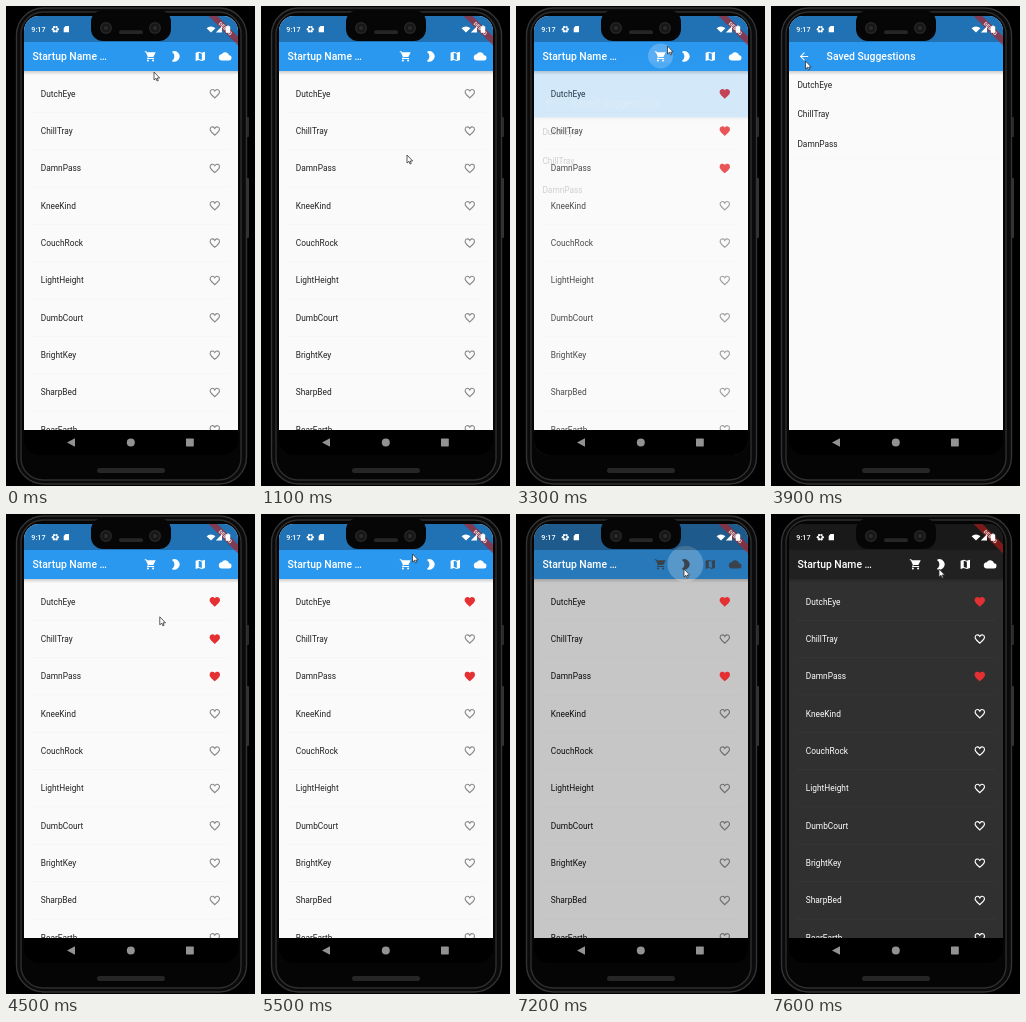
Write an HTML page with a canvas that moves like this. It is 249 px wide and 480 px high and loops after 8 s.

```html
<!DOCTYPE html>
<html lang="en">
<head>
<meta charset="utf-8">
<title>Startup Name</title>
<style>
html, body { margin: 0; width: 100%; height: 100%; overflow: hidden; background: #000; }
canvas { display: block; width: 249px; height: 480px; }
</style>
</head>
<body>
<canvas id="stage"></canvas>
<script>
const W = 249, H = 480, LOOP = 8000, STEP = 100;
const DP = 0.52; // stage pixels per device pixel
const LEFT = 18, TOP = 10, WIDE = 214, BAR = 65, NAV = 424;
const FONT = 'Roboto, "Open Sans", sans-serif';
const GREY = '#929292';
const canvas = document.getElementById('stage');
const ctx = canvas.getContext('2d');
const dpr = window.devicePixelRatio || 1;
canvas.width = Math.round(W * dpr);
canvas.height = Math.round(H * dpr);

const NAMES = ['DutchEye', 'ChillTray', 'DamnPass', 'KneeKind', 'CouchRock',
  'LightHeight', 'DumbCourt', 'BrightKey', 'SharpBed', 'BearEarth'];
const TOOLS = ['cart', 'moon', 'map', 'cloud'];

// shapes on a 24 unit grid
const ICONS = {
  cart: 'M1 2h3l1 2h17l-4.500 9H8.500l-1 2H19v2H5l2-4-4-9H1z' +
    'M5 20a2 2 0 0 0 4 0a2 2 0 0 0-4 0zM15 20a2 2 0 0 0 4 0a2 2 0 0 0-4 0z',
  moon: 'M5 3.340a10 10 0 1 1 0 17.320a10 10 0 0 0 0-17.320z',
  map: 'M3 5l6-2 6 2 6-2v16l-6 2-6-2-6 2zM9 5v12l6 2V7z',
  cloud: 'M19.350 10A7.500 7.500 0 0 0 5.350 8A6 6 0 0 0 6 20h13a5 5 0 0 0 .35-10z',
  heart: 'M12 21.300C5 15 2 12.300 2 8.500A5.500 5.500 0 0 1 12 5.100A5.500 5.500 0 0 1 22 8.500C22 12.300 19 15 12 21.300z',
  back: 'M20 11H8l5.500-5.500L12 4l-8 8 8 8 1.500-1.500L8 13h12z'
};
for (const k in ICONS) ICONS[k] = new Path2D(ICONS[k]);
const POINTER = new Path2D('M0 0V8L2 6.300 3 9 4.300 8.500 3.200 6H5.700z');

const rowY = i => 87.6 + 37.35 * i;
const toolX = i => 144.5 + 24.9 * i;
const SPOTS = {
  like: row => [209, rowY(row)],
  open: () => [151.5, 40],
  close: () => [34.5, 55],
  theme: () => [168, 55],
  hover: (x, y) => [x, y]
};
const tap = (at, kind, ...args) => ({ at, kind, row: args[0], spot: SPOTS[kind](...args) });
const PLAN = [
  tap(0, 'hover', 148, 66), tap(1000, 'hover', 146, 149),
  tap(1700, 'like', 0), tap(2200, 'like', 1), tap(2800, 'like', 2),
  tap(3200, 'open'), tap(4000, 'close'), tap(4800, 'like', 1),
  tap(5600, 'open'), tap(6385, 'close'), tap(6500, 'hover', 152, 51),
  tap(7000, 'theme')
];
const taps = kind => PLAN.filter(s => s.kind === kind);
const SLIDE = 270;

const clamp = v => Math.max(0, Math.min(1, v));
const lerp = (a, b, p) => a + (b - a) * p;
const smooth = p => p * p * (3 - 2 * p);
const mix = (a, b, p) => `rgb(${a.map((v, i) => Math.round(lerp(v, b[i], p)))})`;

function bezier(x1, y1, x2, y2, x) {
  const at = (a, b, s) => 3 * a * s * (1 - s) ** 2 + 3 * b * s * s * (1 - s) + s ** 3;
  let lo = 0, hi = 1;
  for (let i = 0; i < 24; i++) {
    const mid = (lo + hi) / 2;
    if (at(x1, x2, mid) < x) lo = mid; else hi = mid;
  }
  return at(y1, y2, lo);
}

function rect(x, y, w, h, fill) {
  ctx.fillStyle = fill;
  ctx.fillRect(x, y, w, h);
}

function box(x, y, w, h, r, fill, stroke) {
  ctx.beginPath();
  ctx.roundRect(x, y, w, h, r);
  ctx.fillStyle = fill;
  ctx.fill();
  if (!stroke) return;
  ctx.strokeStyle = stroke;
  ctx.lineWidth = 1.4;
  ctx.stroke();
}

function disc(x, y, r, fill) {
  ctx.beginPath();
  ctx.arc(x, y, r, 0, 7);
  ctx.fillStyle = fill;
  ctx.fill();
}

function poly(points, fill) {
  ctx.beginPath();
  points.forEach(p => ctx.lineTo(...p));
  ctx.fillStyle = fill;
  ctx.fill();
}

function text(s, x, y, size, weight, fill, align = 'left') {
  ctx.font = `${weight} ${size}px ${FONT}`;
  ctx.textAlign = align;
  ctx.fillStyle = fill;
  ctx.fillText(s, x, y);
}

function icon(name, x, y, color, outline) {
  ctx.save();
  ctx.translate(x, y);
  ctx.scale(DP, DP);
  ctx.translate(-12, -12);
  if (outline) {
    ctx.clip(ICONS[name]);
    ctx.strokeStyle = color;
    ctx.lineWidth = 4.2;
    ctx.stroke(ICONS[name]);
  } else {
    ctx.fillStyle = color;
    ctx.fill(ICONS[name], 'evenodd');
  }
  ctx.restore();
}

function barRipple(t, start, x) {
  const age = t - start;
  if (age < 0 || age > 550) return;
  const a = 0.22 * clamp((550 - age) / 350);
  disc(x, 50, lerp(7, 18, clamp(age / 200)), `rgba(255,255,255,${a})`);
}

function appBar(fill) {
  const g = ctx.createLinearGradient(0, BAR, 0, BAR + 4);
  g.addColorStop(0, 'rgba(0,0,0,.18)');
  g.addColorStop(1, 'rgba(0,0,0,0)');
  rect(LEFT, BAR, WIDE, 4, g);
  rect(LEFT, TOP, WIDE, BAR - TOP, fill);
}

const isLiked = (t, row) =>
  taps('like').filter(s => s.row === row && t >= s.at).length % 2 === 1;

function tileRipple(t, { at, row }) {
  const age = t - at;
  if (age < 0 || age >= 500) return;
  const y = rowY(row);
  ctx.save();
  ctx.beginPath();
  ctx.rect(26, y - 15, 198, 29.5);
  ctx.clip();
  const a = 0.36 * clamp((500 - age) / 200);
  disc(211, y, lerp(10, 25.5, clamp(age / 100)), `rgba(200,200,200,${a})`);
  ctx.restore();
}

function homePage(t) {
  const { at } = taps('theme')[0];
  const p = smooth(clamp((t - at - 100) / 300));
  const dark = p > 0.5;
  const ink = dark ? '#fff' : p ? '#0c0c0c' : '#212121';
  const tool = p && !dark ? '#3a434c' : '#fff';
  rect(LEFT, TOP, WIDE, NAV - TOP, mix([250, 250, 250], [48, 48, 48], p));
  taps('like').forEach(s => tileRipple(t, s));
  NAMES.forEach((name, i) => {
    const y = rowY(i), on = isLiked(t, i);
    text(name, 34.8, y + 3, 8.33, 400, ink);
    icon('heart', 208.8, y + 0.2, on ? '#e53033' : dark ? '#fff' : 'rgba(0,0,0,.45)', !on);
    rect(26, y + 18.4, 198, 0.6, dark ? 'rgba(255,255,255,.04)' : 'rgba(0,0,0,.03)');
  });
  appBar(mix([43, 152, 240], [33, 33, 33], p));
  taps('open').forEach(s => barRipple(t, s.at, toolX(0)));
  barRipple(t, at, toolX(1));
  text('Startup Name …', 26.4, 54.2, 10.4, 500, '#fff');
  TOOLS.forEach((name, i) => icon(name, toolX(i), 50.4, tool));
}

function savedPage(t) {
  const closes = taps('close').map(s => s.at);
  const turn = taps('open').findIndex((s, i) => t > s.at && t < closes[i] + SLIDE);
  if (turn < 0) return;
  const open = taps('open')[turn].at, close = closes[turn];
  const v = clamp((t - open) / SLIDE) - clamp((t - close) / SLIDE);
  ctx.save();
  ctx.globalAlpha = bezier(0.42, 0, 1, 1, v);
  ctx.translate(0, 103 * (1 - bezier(0.4, 0, 0.2, 1, v)));
  rect(LEFT, BAR, WIDE, NAV - BAR, '#fafafa');
  NAMES.filter((_, i) => isLiked(t, i)).forEach((name, i) => {
    const y = 79.3 + 29.1 * i;
    text(name, 26.4, y + 3, 8.33, 400, '#212121');
    rect(LEFT, y + 14.5, WIDE, 0.5, 'rgba(0,0,0,.025)');
  });
  appBar('#2b98f0');
  barRipple(t, close - 50, 33);
  icon('back', 33, 50.4, '#fff');
  text('Saved Suggestions', 55.6, 54.2, 10.4, 500, '#fff');
  ctx.restore();
}

function statusIcons() {
  text('9:17', 25.3, 25.8, 7.2, 500, '#fff');
  for (let i = 0; i < 6; i++) {
    const a = i * Math.PI / 3;
    disc(49.3 + 2.4 * Math.cos(a), 23.2 + 2.4 * Math.sin(a), 1.2, '#fff');
  }
  poly([[59.5, 20], [63, 20], [63, 26.3], [57.7, 26.3], [57.7, 22]], '#fff');
  ctx.beginPath();
  ctx.moveTo(205, 26.4);
  ctx.arc(205, 26.4, 6, -Math.PI * 0.76, -Math.PI * 0.24);
  ctx.fill();
  poly([[209.8, 26.4], [216, 20.2], [216, 26.4]], '#fff');
  box(219.8, 20.3, 4.4, 6.4, 0.5, '#fff');
  rect(221, 19.6, 2, 1, '#fff');
}

function ribbon() {
  ctx.save();
  ctx.translate(LEFT + WIDE, TOP);
  ctx.rotate(Math.PI / 4);
  rect(-40 * DP, 28 * DP, 80 * DP, 12 * DP, 'rgba(183,28,28,.63)');
  text('DEBUG', 0, 19.6, 5.2, 900, 'rgba(255,255,255,.8)', 'center');
  ctx.restore();
}

function phone() {
  rect(0, 0, W, H, '#000');
  box(240, 111, 3, 20, 1, '#2a2a2a');
  box(240, 172, 3, 60, 1, '#333');
  box(10.5, 2, 230, 476, 27, '#0a0a0a', '#333');
  box(15, 6, 220, 468, 22, '#050505', '#2e2e2e');
  box(91, 462, 68, 5, 2.5, '#262626');
}

function notch() {
  ctx.fillStyle = '#060606';
  ctx.beginPath();
  ctx.roundRect(85, 4, 80, 31, 12);
  ctx.fill();
  for (const x of [100, 149]) {
    disc(x, 22, 6, '#262626');
    disc(x, 22, 4.5, '#171717');
    disc(x, 22, 2, '#2c2c2c');
  }
  box(113, 24.3, 24, 3.8, 1.9, '#262626');
}

function navBar() {
  rect(LEFT, NAV, WIDE, 25, '#000');
  poly([[61, 436.5], [69, 432.2], [69, 440.8]], GREY);
  disc(124.8, 436.5, 4, GREY);
  box(180, 432.6, 7.8, 7.8, 0.6, GREY);
}

// rests after each tap, then glides and settles before the next one
function pointer(t) {
  const i = PLAN.findIndex(s => s.at > t);
  const to = PLAN[i < 0 ? PLAN.length - 1 : i];
  const from = i < 0 ? to : PLAN[i - 1];
  const p = i < 0 ? 1 : smooth(clamp(((t - from.at) / (to.at - from.at) - 0.4) / 0.36));
  ctx.save();
  ctx.translate(...from.spot.map((v, k) => lerp(v, to.spot[k], p)));
  ctx.fillStyle = '#fff';
  ctx.strokeStyle = '#333';
  ctx.lineWidth = 0.8;
  ctx.fill(POINTER);
  ctx.stroke(POINTER);
  ctx.restore();
}

function draw(t) {
  ctx.setTransform(dpr, 0, 0, dpr, 0, 0);
  phone();
  ctx.save();
  ctx.beginPath();
  ctx.roundRect(LEFT, TOP, WIDE, 439, 15);
  ctx.clip();
  homePage(t);
  savedPage(t);
  rect(LEFT, TOP, WIDE, 26, 'rgba(0,0,0,.25)');
  ribbon();
  statusIcons();
  navBar();
  ctx.restore();
  notch();
  pointer(t);
}

const begin = performance.now();
function tick(now) {
  const t = Math.max(0, now - begin) % LOOP;
  draw(Math.floor(t / STEP) * STEP);
  requestAnimationFrame(tick);
}
draw(0);
requestAnimationFrame(tick);
</script>
</body>
</html>
```
